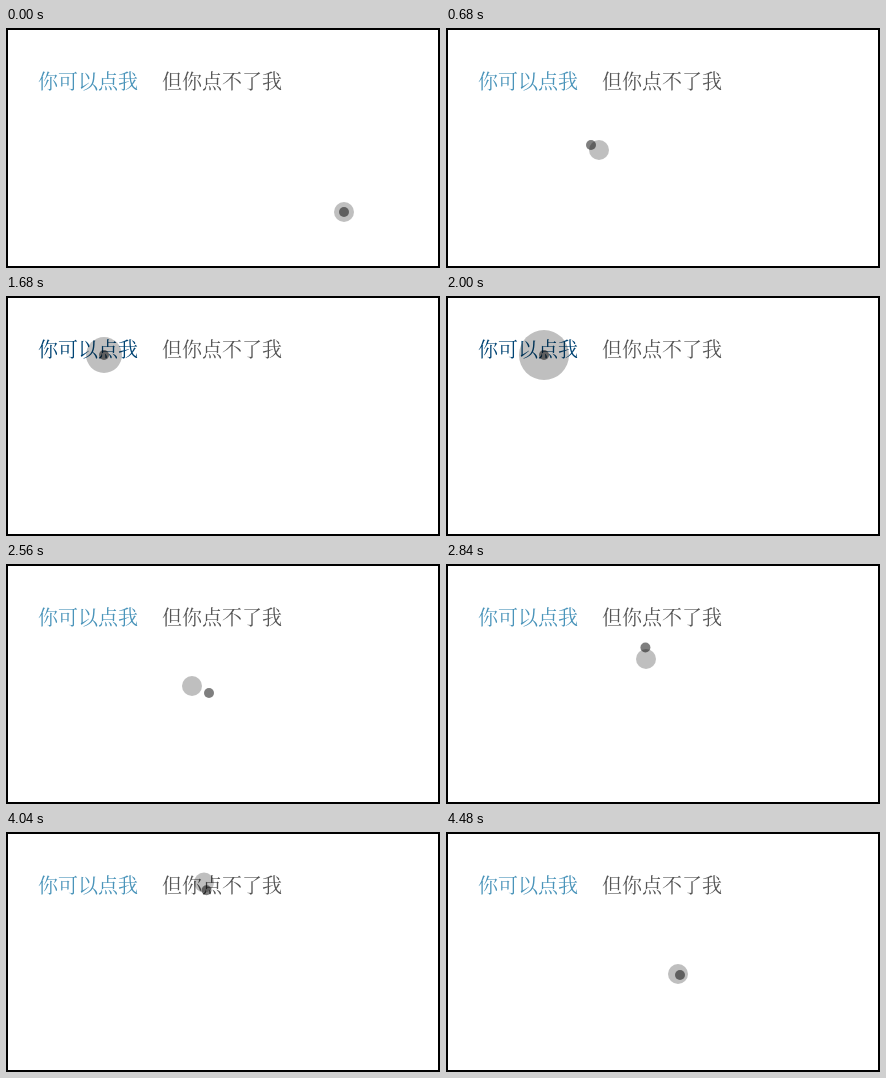
These frames come from a looping animation (434x240 px, 4.56 s). An HTML page:

```html
<!DOCTYPE html>
<html lang="zh-CN">
<head>
<meta charset="utf-8">
<style>
html, body { margin: 0; width: 100%; height: 100%; overflow: hidden; background: #fff; }
svg { display: block; width: 100vw; height: 100vh; }
text { font: 400 20px "Noto Serif CJK SC", "Noto Sans CJK SC", "Noto Sans CJK", serif; }
</style>
</head>
<body>
<svg viewBox="0 0 434 240">
  <rect width="434" height="240" fill="#fff"/>
  <text id="link" x="32" y="61">你可以点我</text>
  <text x="156" y="61" fill="#555">但你点不了我</text>
  <rect x="1" y="1" width="432" height="238" fill="none" stroke="#000" stroke-width="2"/>
  <circle id="ring" fill="#000" fill-opacity=".25"/>
  <circle id="dot" r="5" fill="#000" fill-opacity=".5"/>
</svg>
<script>
const LOOP = 4560, STEP = 80, LAG = 80, PRESS = 400;
const $ = id => document.getElementById(id);
const link = $('link'), ring = $('ring'), dot = $('dot');
const idle = [74, 148, 186], active = [0, 68, 116];

// where the pointer rests or turns
const path = [
  { t: 200, x: 338, y: 184 },
  { t: 600, x: 153, y: 122 },
  { t: 680, x: 145, y: 117 },
  { t: 1000, x: 105, y: 69 },
  { t: 1200, x: 98, y: 59 },
  { t: 2240, x: 98, y: 59 },
  { t: 2480, x: 186, y: 122 },
  { t: 2560, x: 203, y: 129 },
  { t: 2760, x: 200, y: 95 },
  { t: 3160, x: 198, y: 50.5 },
  { t: 3960, x: 198, y: 50.5 },
  { t: 4400, x: 232, y: 142 },
  { t: 4480, x: 234, y: 143 }
];

const clamp = u => Math.min(1, Math.max(0, u));
const ramp = (t, from, to) => {
  const u = clamp((t - from) / (to - from));
  return u * u * (3 - 2 * u);
};
const dip = (t, from) => Math.sin(Math.PI * clamp((t - from) / PRESS)) ** 2;
const hover = t => ramp(t, 1080, 1360) - ramp(t, 2240, 2480);
const press = t => 1 - 0.43 * (dip(t, 1560) + dip(t, 3400));

// slope at a path point: level at turns and ends, so the curve never overshoots
function slope(i, axis) {
  const a = path[i - 1], b = path[i], c = path[i + 1];
  if (!a || !c) return 0;
  const p = (b[axis] - a[axis]) / (b.t - a.t), q = (c[axis] - b[axis]) / (c.t - b.t);
  return p * q > 0 ? 2 * p * q / (p + q) : 0;
}

function along(t, axis) {
  const last = path.length - 1;
  if (t <= path[0].t) return path[0][axis];
  if (t >= path[last].t) return path[last][axis];
  const i = path.findIndex(k => k.t > t), a = path[i - 1], b = path[i];
  const d = b.t - a.t, u = (t - a.t) / d, v = 1 - u;
  return v * v * ((1 + 2 * u) * a[axis] + u * d * slope(i - 1, axis))
       + u * u * ((1 + 2 * v) * b[axis] - v * d * slope(i, axis));
}

// the picture advances in 80 ms steps whose phase shifts a few times
function snap(t) {
  const base = [4240, 2600, 1280, -40].find(b => b <= t);
  return Math.max(0, t - (t - base) % STEP);
}

function place(el, t) {
  el.setAttribute('cx', along(t, 'x'));
  el.setAttribute('cy', along(t, 'y'));
}

function draw(ms) {
  const t = snap(ms % LOOP), h = hover(t);
  place(dot, t);
  place(ring, t - LAG);
  ring.setAttribute('r', (10 + 15 * h) * press(t));
  link.setAttribute('fill', `rgb(${idle.map((v, i) => Math.round(v + (active[i] - v) * h))})`);
}

const start = performance.now();
function tick() {
  draw(performance.now() - start);
  requestAnimationFrame(tick);
}
tick();
</script>
</body>
</html>
```
